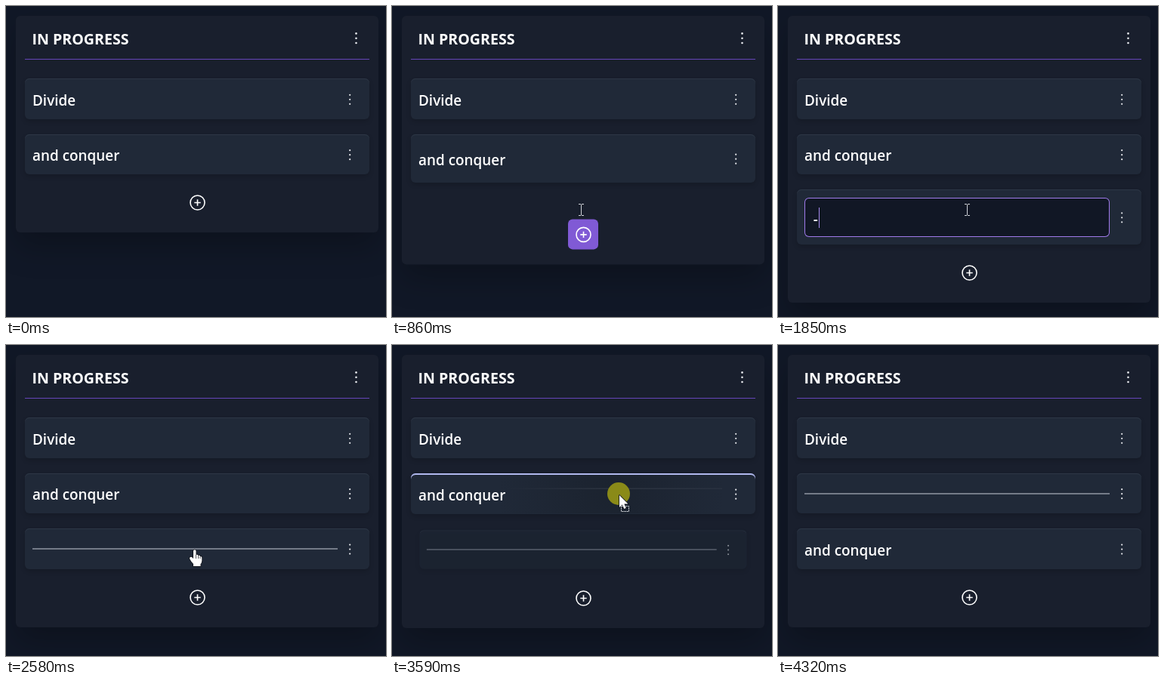
Write an HTML page with a canvas that moves like this. It is 503x412 px and loops after 4520 ms.

```html
<!DOCTYPE html>
<html lang="en">
<head>
<meta charset="utf-8">
<title>Task column</title>
<style>
html, body { margin: 0; width: 100%; height: 100%; overflow: hidden; background: #111827; }
canvas { display: block; }
</style>
</head>
<body>
<canvas id="stage" width="503" height="412"></canvas>
<script>
const ctx = document.getElementById('stage').getContext('2d');
const LOOP = 4520, TICK = 66.4;
const FONT = '"Open Sans", "Noto Sans", sans-serif';
const TOP = 96.4, PITCH = 73.4, CARD = 53.4;
const HAND = new Path2D('M-2 1.5Q-.3 -1 1.5 1.5V7Q3.5 6 4.5 8Q6.5 7 7 9Q9 8.5 9.3 10.5V15Q9 18 7.5 19V22H-2V19Q-5 16 -7 12Q-7 9 -4 10L-2 12Z');
const KNUCKLES = new Path2D('M1.5 7V12M4.5 8V12M7 9V12');
const ARROW = new Path2D('M0 0V16L3.8 12.5L6.3 18L8.8 17L6.4 11.6H11.5Z');

// When things happen, in ticks
const ENTER = 4, CLICK = 11, READY = 17, COMMIT = 39, MOVE = 44, PRESS = 47, DRAG = 51, DROP = 59, END = 65;

const ramp = (n, a, b) => Math.min(1, Math.max(0, (n - a) / (b - a)));
const mix = (a, b, p) => a + (b - a) * p;
const easeOut = (p, k) => 1 - (1 - p) ** k;
const smooth = p => p * p * (3 - 2 * p);
const slot = i => TOP + PITCH * i;

function box(x, y, w, h, r, fill) {
  ctx.beginPath();
  ctx.roundRect(x, y, w, h, r);
  ctx.fillStyle = fill;
  ctx.fill();
}

function shadowBox(x, y, w, h, fill, color, blur, dy) {
  ctx.save();
  ctx.shadowColor = color;
  ctx.shadowBlur = blur;
  ctx.shadowOffsetY = dy;
  box(x, y, w, h, 6, fill);
  ctx.restore();
}

function faded(alpha, draw) {
  if (alpha <= 0) return;
  ctx.save();
  ctx.globalAlpha = alpha;
  draw();
  ctx.restore();
}

function text(str, x, y, size = 18.9, weight = 600) {
  ctx.font = `${weight} ${size}px ${FONT}`;
  ctx.fillStyle = '#fff';
  ctx.fillText(str, x, y);
}

function dots(x, y, r, gap) {
  ctx.fillStyle = '#e8eaee';
  for (let i = -1; i < 2; i++) {
    ctx.beginPath();
    ctx.arc(x, y + i * gap, r, 0, 7);
    ctx.fill();
  }
}

function card(y, h = CARD, edge = '#2d3746', edgeW = 1) {
  const top = Math.round(y), tall = Math.round(y + h) - top;
  shadowBox(25, top, 456, tall, '#202938', 'rgba(0,0,0,.16)', 6, 3);
  ctx.save();
  ctx.beginPath();
  ctx.roundRect(25, top, 456, tall, 6);
  ctx.clip();
  ctx.beginPath();
  ctx.rect(25, top, 456, 10);
  ctx.roundRect(25, top + edgeW, 456, tall, 6);
  ctx.rect(25, top + 10, 456, tall);
  ctx.clip('evenodd');
  ctx.fillStyle = edge;
  ctx.fillRect(25, top, 456, 8);
  ctx.restore();
  dots(455.2, y + h / 2 + 0.7, 1.1, 6);
}

function textCard(str, y, grown = 0, target = false) {
  const lift = target ? 1 : 0;
  if (target) card(y, CARD + lift, '#b0b8ee', 2);
  else card(y, CARD + grown);
  text(str, 35, Math.round(y + 35.5 + grown / 2 + lift));
}

function lineCard(y) {
  card(y);
  ctx.fillStyle = '#747b88';
  ctx.fillRect(35, Math.round(y) + 26, 404, 2);
}

function inputCard(n) {
  card(slot(2), 72.8);
  box(35, 254, 404, 52, 6, '#9f7aea');
  box(36, 255, 402, 50, 5, '#111725');
  const count = Math.floor(3 * ramp(n, 26, 32));
  for (let i = 0; i < count; i++) text('-', 46.8 + i * 8, 289);
  if (n >= 16 && n < 19 || n >= 28 && n < 36) {
    ctx.fillStyle = '#a78bee';
    ctx.fillRect(46 + count * 8, 267, 1, 27);
  }
}

function addButton(y, hover) {
  faded(hover, () => box(233, y - 20.5, 40, 40, 6, '#805ad5'));
  ctx.strokeStyle = '#fff';
  ctx.lineWidth = 1.6;
  ctx.beginPath();
  ctx.arc(253.5, y, 9.5, 0, 7);
  ctx.moveTo(249.3, y);
  ctx.lineTo(257.7, y);
  ctx.moveTo(253.5, y - 4.2);
  ctx.lineTo(253.5, y + 4.2);
  ctx.stroke();
}

// The picked-up card left behind, shrunk and dimmed
function heldCard(n) {
  const held = ramp(n, DRAG - 1, DRAG + 2), gone = ramp(n, DROP - 1, DROP + 2);
  const scale = 1 - 0.05 * held - 0.02 * gone;
  faded(1 - 0.45 * held - 0.55 * gone, () => {
    ctx.translate(253, 270 + held + gone);
    ctx.scale(scale, scale);
    ctx.translate(-253, -270);
    (n < DROP ? lineCard : card)(slot(2));
  });
  if (n >= DROP) faded(1 - ramp(n, DROP + 1, DROP + 4), () => box(49.5, 257.5, 376, 29, 0, '#5b7a72'));
}

// Soft drag image, strongest near the pointer
function dragImage(x, y) {
  ctx.save();
  ctx.beginPath();
  ctx.rect(25, slot(1) + 2.2, 456, CARD - 1);
  ctx.clip();
  const haze = ctx.createRadialGradient(x - 10, y, 10, x - 10, y, 150);
  haze.addColorStop(0, 'rgba(25,32,43,.65)');
  haze.addColorStop(1, 'rgba(25,32,43,0)');
  box(x - 266, y - 27, 456, 53, 6, haze);
  const line = ctx.createLinearGradient(x - 150, 0, x + 137, 0);
  line.addColorStop(0, 'rgba(116,123,136,0)');
  line.addColorStop(0.5, 'rgba(116,123,136,.2)');
  line.addColorStop(1, 'rgba(116,123,136,.1)');
  ctx.fillStyle = line;
  ctx.fillRect(x - 150, y - 7.5, 287, 1.5);
  ctx.restore();
}

function pointer(shape, x, y) {
  ctx.save();
  ctx.translate(x, y);
  ctx.strokeStyle = '#10131a';
  ctx.lineWidth = 1.6;
  ctx.lineJoin = 'round';
  ctx.stroke(shape);
  ctx.fillStyle = '#fff';
  ctx.fill(shape);
  ctx.lineWidth = 0.7;
  if (shape === HAND) ctx.stroke(KNUCKLES);
  ctx.restore();
}

function beam(x, y) {
  ctx.fillStyle = '#d0d3d9';
  ctx.fillRect(x, y - 7, 1, 14);
  for (const dy of [-8, 7]) {
    ctx.fillRect(x - 3, y + dy, 3, 1);
    ctx.fillRect(x + 1, y + dy, 3, 1);
  }
}

function cursor(n, x, y) {
  if (n < ENTER || n >= END) return;
  if (n >= PRESS && n < DROP) {
    ctx.beginPath();
    ctx.arc(x, y, 15, 0, 7);
    ctx.fillStyle = '#8a8a18';
    ctx.fill();
  }
  if (n >= DRAG && n < DROP) {
    pointer(ARROW, x + 1, y + 2);
    ctx.strokeStyle = '#e4e6ea';
    ctx.lineWidth = 1;
    ctx.setLineDash([2, 1]);
    ctx.strokeRect(x + 3.5, y + 16.5, 10, 7);
    ctx.setLineDash([]);
  } else if (n > CLICK + 1 && n < COMMIT) {
    beam(x, y);
  } else {
    pointer(n < CLICK - 1 ? ARROW : HAND, x + (n < DROP ? 0 : 2), y + 1);
  }
}

function draw(n) {
  const over = n >= DRAG + 2 && n < DROP;
  const lift = n >= DRAG + 2 && n < DROP + 2 ? 1 : 0;
  const grow = easeOut(ramp(n, CLICK, READY), 1.5);
  const slide = easeOut(ramp(n, DROP - 1, END), 1.33);
  const plusY = n < COMMIT ? 260.5 + 93 * grow : 334.5;

  const come = easeOut(ramp(n, ENTER, CLICK), 1.5);
  const move = ramp(n, MOVE - 1, PRESS), drag = smooth(ramp(n, DRAG - 1, DRAG + 3));
  const x = mix(266, 250, come) + 51 * move - drag;
  const y = mix(400, 270, come) + 14 * move + 20 * Math.sin(Math.PI * move) - 87 * drag;

  ctx.fillStyle = '#111827';
  ctx.fillRect(0, 0, 503, 412);
  shadowBox(13, 13, 480, plusY + 26.5 + over, '#191f2d', 'rgba(0,0,0,.25)', 42, 18);

  text('IN PROGRESS', 34.5, 51, 19.6, 700);
  dots(463.5, 42.7, 1.3, 6.3);
  ctx.fillStyle = '#6546b8';
  ctx.fillRect(25, 70, 456, 1);

  textCard('Divide', slot(0));
  if (n >= DRAG && n < DROP + 4) heldCard(n);
  faded(ramp(n, DROP + 1, END), () => lineCard(slot(1)));
  textCard('and conquer', slot(1 + slide), 11 * Math.sin(Math.PI * grow), over);

  if (n < COMMIT) faded(ramp(n, CLICK + 2, READY), () => inputCard(n));
  else if (n < DRAG) lineCard(slot(2));

  addButton(plusY + lift, ramp(n, CLICK - 3, CLICK - 1) - ramp(n, CLICK + 2, READY - 1));
  if (n >= DRAG && n < DROP) dragImage(x, y);
  cursor(n, x, y);
}

let start;
function frame(now) {
  start ??= now;
  draw(Math.floor(((now - start) % LOOP + 14) / TICK));
  requestAnimationFrame(frame);
}
requestAnimationFrame(frame);
</script>
</body>
</html>
```
